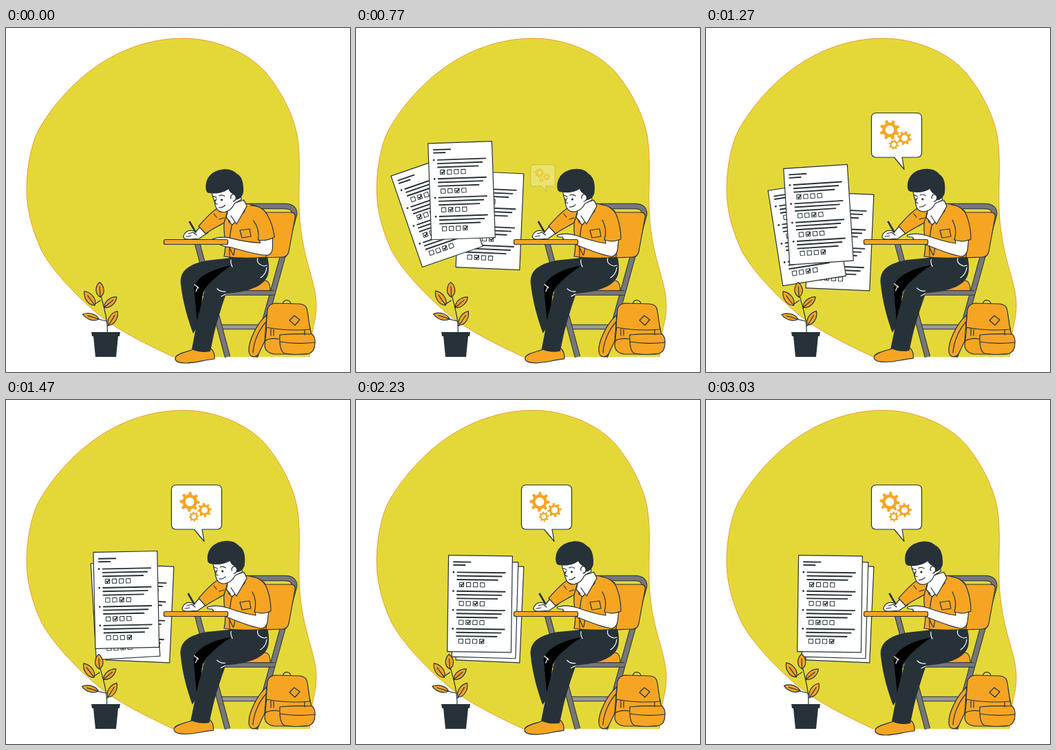
An HTML page that plays this animation: 500 px wide and 500 px high, repeating every 3.06 s.

```html
<!DOCTYPE html>
<html lang="en">
<head>
<meta charset="utf-8">
<title>Exam</title>
<style>
html, body { margin: 0; width: 100%; height: 100%; overflow: hidden; background: #fff; }
svg { display: block; width: 100vw; height: 100vh; }
.o { fill: #f6a523; } .w { fill: #fff; } .d { fill: #263238; } .n { fill: none; }
.l { stroke: #263238; stroke-width: 1.2; stroke-linejoin: round; stroke-linecap: round; }
.c { fill: none; stroke: #fff; stroke-width: 1.2; stroke-linecap: round; }
</style>
</head>
<body>
<svg id="stage" viewBox="0 0 500 500"></svg>
<script>
const LOOP = 3060;
const path = (d, cls) => `<path d="${d}" class="${cls}"/>`;
const group = (id, body) => `<g id="${id}">${body}</g>`;
const line = (d, color, width) => `<path d="${d}" fill="none" stroke="${color}" stroke-width="${width}" stroke-linejoin="round"/>`;
const tube = (d, width, color = '#777') => line(d, '#263238', width + 1.6) + line(d, color, width - 0.4);

function leaf(bx, by, tx, ty, width) {
  const dx = tx - bx, dy = ty - by, k = width / Math.hypot(dx, dy);
  const point = (u, s) => `${bx + dx * u - s * dy * k} ${by + dy * u + s * dx * k}`;
  return path(`M${bx} ${by}C${point(.2, 1)} ${point(.7, 1)} ${tx} ${ty}C${point(.7, -1)} ${point(.2, -1)} ${bx} ${by}Z`, 'o l') +
    path(`M${bx} ${by}L${point(.7, 0)}`, 'n l');
}

function gear(id, r, hole, teeth) {
  let d = '';
  for (let i = 0; i < teeth; i++) {
    [[-.27, .74], [-.17, 1], [.17, 1], [.27, .74]].forEach(([o, k]) => {
      const a = (i + o) / teeth * 2 * Math.PI;
      d += `${d ? 'L' : 'M'}${(r * k * Math.cos(a)).toFixed(2)} ${(r * k * Math.sin(a)).toFixed(2)}`;
    });
  }
  d += `ZM${hole} 0A${hole} ${hole} 0 1 0 ${-hole} 0A${hole} ${hole} 0 1 0 ${hole} 0Z`;
  return `<path id="${id}" class="o" fill-rule="evenodd" d="${d}"/>`;
}

function sheet(id, checks) {
  let s = '<rect x="-46.4" y="-70" width="92.8" height="140" class="w l"/>';
  let text = 'M-39.5 -60.5h26M-39.5 -56h18', boxes = '', ticks = '';
  checks.forEach((checked, row) => {
    const y = -45.5 + row * 27.4;
    text += `M-34 ${y}h71M-34 ${y + 5.2}h66M-34 ${y + 10.6}h60`;
    s += `<circle cx="-38.8" cy="${y}" r="1.4" class="d"/>`;
    for (let i = 0; i < 4; i++) boxes += `M${-30 + i * 10.1} ${y + 14.8}h6.2v6.2h-6.2z`;
    ticks += `M${-28.7 + checked * 10.1} ${y + 17.6}l1.8 2l3.4 -4.6`;
  });
  return group(id, s + line(text, '#263238', 1.9) + line(boxes, '#263238', 1) + line(ticks, '#263238', 1.7));
}

const blob = `<path fill="#e4d839" stroke="#ee9a2c" stroke-width="1" d="M243 478C205 460 163 440 134 416
  C98 386 66 350 52 324C37 292 30 262 30 235C30 200 38 165 48 147C63 121 82 97 109 73C147 40 198 15 258 15
  C300 15 350 33 378 65C400 92 417 125 423 155C429 190 425 225 426 260C427 300 435 330 442 355
  C449 380 453 395 450 418C448 432 444 440 441 478"/>`;

const papers = group('papers', sheet('right', [0, 2, 3, 1]) + sheet('left', [1, 0, 0, 2]) + sheet('front', [0, 2, 1, 3]));

const plant = group('plant',
  path('M147 446C149 428 143 408 137 386M143 407L150 399M137 396L128 402M146 426L133 423M147 434L152 428', 'n l') +
  leaf(137, 391, 136, 369.5, 7.5) + leaf(129, 403, 114, 382.5, 7.5) + leaf(143, 406, 161, 391, 6.5) +
  leaf(135, 423, 111.5, 416, 6) + leaf(149, 432, 162, 411.5, 7)) +
  path('M124 442H166L165 448H163L160 478H130L127 448H125Z', 'd');

const bubble = group('bubble',
  path('M247.5 123.5H306.5Q313.5 123.5 313.5 130.5V181Q313.5 188 306.5 188H285L288 205.5L273.5 188H247.5Q240.5 188 240.5 181V130.5Q240.5 123.5 247.5 123.5Z', 'w l') +
  gear('gearA', 14.6, 6.3, 8) + gear('gearB', 10.4, 4.6, 8) + gear('gearC', 7.4, 3.3, 8));

const chair =
  tube('M347 259H405Q420 259 419 271L362 478', 7) +
  path('M360 268L413 268Q422 268 420 276L411 325Q409 333 402 333L372 334Z', 'o l') +
  tube('M308 434.5H371', 6, '#999') + tube('M278 313L322 478', 7) +
  path('M282 382Q283 368 294 367H376Q384 367 384 382Z', 'o l') +
  tube('M276 385H390', 6);

const legs = group('legs',
  path('M273 467C262 471 249 473 246 479C245 484 250 487 262 487C277 487 285 483 303 481C304 475 301 468 298 466Z', 'o l') +
  path('M328 334L292 338C267 343 252 352 254 372C257 400 265 425 272 444L281 430L285 386L328 346Z', 'd') +
  '<path d="M328 345C300 350 276 362 273 378L278 428L284 405L286 385C292 372 305 362 328 345Z"/>' +
  path('M323 332L380 333C382 340 383 350 381 358C376 377 348 384 320 386C315 400 307 425 302 446L297 470C288 472 278 471 270 467L279 420L288 386C293 372 308 358 328 345Z', 'd') +
  path('M274 373L280 378M276 383L279 376M307 379Q312 384 319 383M313 390L319 387M366 334Q363 343 375 346L379 345M379 348Q378 358 370 363M327 337Q326 342 329 347', 'c'));

const torso = path('M321 264C316 272 316 290 318 305C320 318 318 327 317 332Q345 336 378 333C380 318 380 290 376 266C368 259 358 256 347 255Z', 'o l') +
  path('M340 294L354 292L356 303L343 305Z', 'n l') +
  path('M329 284Q324 300 325 331M323 315L330 330M333 318L331 330', 'n l') +
  path('M320 264L324 282L329 286L347 266L346 250L328 256Z', 'w l') +
  path('M347 252L350 259L335 285L327 273M322 268L320 275L326 282', 'w l');

const writingArm = group('writing',
  path('M283 288L276 296C268 293 262 295 259 300C256 305 260 308 268 307L281 306C285 303 290 300 294 297Z', 'w l') +
  line('M266.5 281L276 297.5', '#263238', 2.6) +
  path('M265 299L272 297L277 301M262 303L269 302', 'n l')) +
  path('M309 261C298 267 288 279 280 288L290 299C300 292 309 288 317 283L322 266Z', 'o l') +
  path('M302 270L306 275M310 278L317 276', 'n l');

const restingArm = group('arm',
  group('forearm', path('M362 306L363 313C350 311 335 307 322 302C313 299 302 298 293 301C291 303 294 304 300 304C302 309 310 313 320 315C337 322 357 330 371 332Q378 332 380 323L382 305Z', 'w l')) +
  path('M357 257C368 258 377 265 380 276C384 287 385 299 385 307Q373 312 361 308C364 298 363 288 358 279Z', 'o') +
  path('M357 257C368 258 377 265 380 276C384 287 385 299 385 307Q373 312 361 308C364 298 363 288 358 279', 'n l'));

const head = group('head',
  path('M300 234C301 241 302 246 304 252C305 262 309 268 318 267C325 266 330 261 333 255L343 250L342 225L305 222Z', 'w l') +
  path('M292.5 233C291 216 303 206 318 205C328 204 335 208 338 212C346 216 348 228 346.5 240C344 248 338 251 334 250L331 241C327 239 326 236 325 234C316 240 304 240 296 238Q293 237 292.5 233Z', 'd') +
  path('M328 248C327 243 331 240 334 243C337 246 335 252 331 252', 'w l') +
  path('M302 243L307 245M311 243Q315 241 319 244M307 247Q304 251 305 254L308 255M310 260Q315 261 319 257M304 249L306 250', 'n l') +
  '<circle cx="314.5" cy="249" r="1.6" class="d"/>');

const desk = '<rect x="229.5" y="307.5" width="93" height="7" rx="2" class="o l"/>';

const bag =
  path('M379 417C364 430 352 456 353 470C354 479 362 480 367 474L376 455Z', 'o l') +
  path('M378 427C368 438 360 455 359 472', 'n l') +
  path('M402 401Q404 394 410 396Q414 397 414 402', 'n l') +
  path('M379 433L376 462Q377 472 390 474H436Q447 473 447 460L441 432Z', 'o l') +
  path('M378 435L380 409Q382 401 391 400L427 401Q437 402 438 411L442 438Q410 441 378 435Z', 'o l') +
  path('M412 425L419 418L427 424L420 432Z', 'n l') +
  path('M385 437V447M389 438V447M434 439V446M398 446Q422 444 445 445Q450 450 449 458Q449 470 441 473Q420 476 405 473Q397 470 398 446Z', 'o l') +
  path('M398 456Q422 460 449 457M376 455Q384 450 397 452', 'n l');

const stage = document.getElementById('stage');
stage.innerHTML = blob + papers + plant + bubble + chair + legs + torso + restingArm + writingArm + head + desk + bag;
const parts = {};
stage.querySelectorAll('[id]').forEach(el => parts[el.id] = el);

// Smooth, non-overshooting interpolation through [time, ...values] keys.
function track(t, keys) {
  const last = keys.length - 1;
  if (t <= keys[0][0]) return keys[0].slice(1);
  if (t >= keys[last][0]) return keys[last].slice(1);
  const i = keys.findIndex((k, n) => t < keys[n + 1][0]);
  const a = keys[i], b = keys[i + 1], span = b[0] - a[0], u = (t - a[0]) / span;
  const slope = (n, j) => (keys[n + 1][j] - keys[n][j]) / (keys[n + 1][0] - keys[n][0]);
  const tangent = (n, j) => {
    if (n === 0) return slope(0, j);
    if (n === last) return 0;
    const p = slope(n - 1, j), q = slope(n, j);
    return p * q <= 0 ? 0 : 2 * p * q / (p + q);
  };
  return a.slice(1).map((v, n) => {
    const j = n + 1, m = tangent(i, j) * span, k = tangent(i + 1, j) * span;
    return v + u * m + u * u * (3 * (b[j] - v) - 2 * m - k) + u * u * u * (2 * (v - b[j]) + m + k);
  });
}

const motion = {
  drop: [[330, -78, 0], [560, -53, 1], [770, -30.4, 1], [1070, 0, 1]],
  front: [[330, 151, 275, 3], [550, 152, 272, 1], [770, 153.5, 266.5, -2], [1070, 154.3, 255.3, -5.3], [1470, 174.8, 290.4, -1.2], [1750, 180, 296.3, .8]],
  left: [[330, 125, 300, -17], [550, 115, 298, -21], [770, 117.5, 296.5, -19], [1070, 123.5, 291.5, -14.3], [1470, 173.5, 305, -3.3], [1750, 187.5, 304.5, 1.6]],
  bubble: [[690, .3, -8, 75, 0], [770, .48, -5.5, 54, .27], [1035, 1.08, .7, -9, 1], [1070, 1.06, .5, -7, 1], [1220, 1, 0, 0, 1]],
  nod: [[0, 0], [770, 2.5], [1070, 3.2], [1470, 3], [1870, .3], [2570, -.5], [3030, -1.5]],
  leg: [[0, 0], [770, .1], [1070, .75], [1870, .75], [2570, .1], [3030, 0]],
  arm: [[0, 1], [375, .5], [750, 0]]
};

const move = (id, transform) => parts[id].setAttribute('transform', transform);
const place = (id, [x, y, angle]) => move(id, `translate(${x} ${y}) rotate(${angle})`);

function draw(t) {
  const [dy, paperAlpha] = track(t, motion.drop);
  move('papers', `translate(0 ${dy})`);
  parts.papers.setAttribute('opacity', paperAlpha);
  place('right', [194.5, 310, 2.5]);
  place('left', track(t, motion.left));
  place('front', track(t, motion.front));

  const [scale, bx, by, alpha] = track(t, motion.bubble);
  move('bubble', `translate(${277 + bx} ${165 + by}) scale(${scale}) translate(-277 -165)`);
  parts.bubble.setAttribute('opacity', alpha);
  const spin = t / LOOP * 360;
  place('gearA', [267, 148, spin + 10]);
  place('gearB', [288.5, 160, spin]);
  place('gearC', [273, 169.5, spin]);

  const sway = -2.2 * Math.cos(2 * Math.PI * (t - 1340) / 1000) - 1.18 + 3 * t / LOOP;
  move('plant', `translate(${sway * .6} 0) rotate(${sway * .4} 147 441)`);

  const [nod] = track(t, motion.nod);
  move('head', `rotate(${(nod - 2.5) * 1.2} 328 268)`);
  move('writing', `translate(${-.65 * Math.max(nod, 0)} 0)`);
  move('legs', `rotate(${track(t, motion.leg)[0]} 375 350)`);
  const [swing] = track(t, motion.arm);
  move('arm', `rotate(${-8 * swing} 365 268)`);
  move('forearm', `rotate(${2 * swing} 378 320)`);
}

const start = performance.now();
function tick() {
  draw((performance.now() - start) % LOOP);
  requestAnimationFrame(tick);
}
tick();
</script>
</body>
</html>
```
